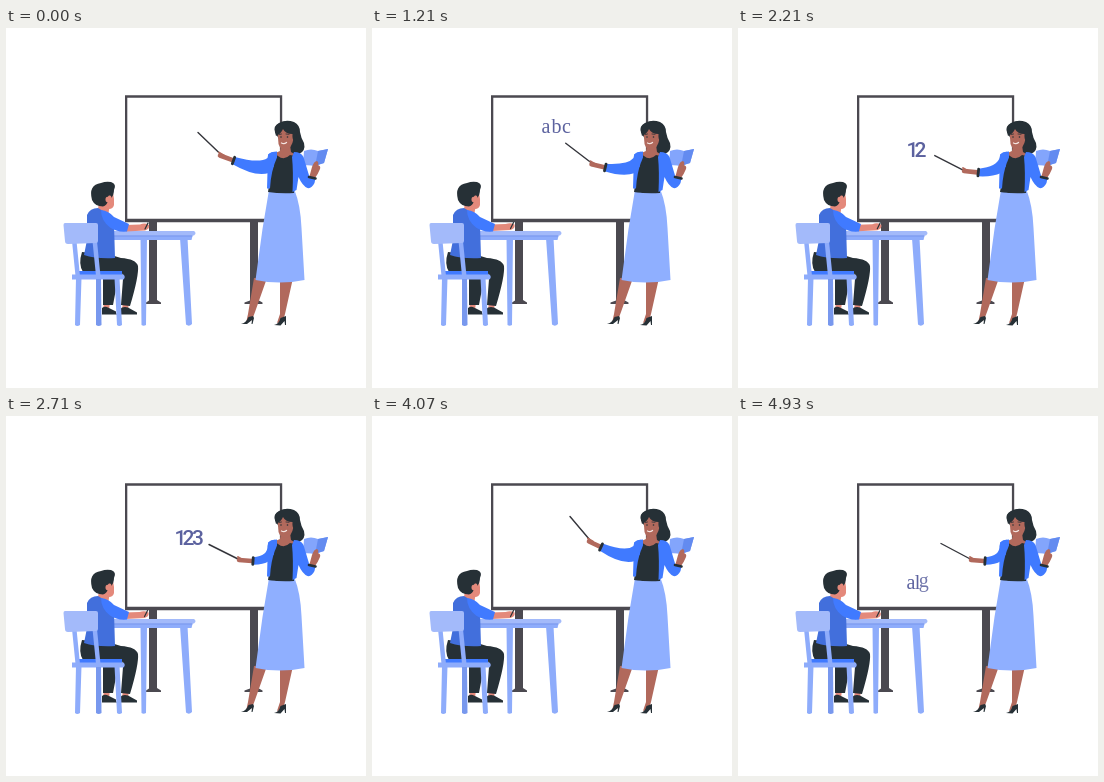
Recreate the animation shown at these times as an HTML page. Size 360x360 px, loop 5 s.

```html
<!DOCTYPE html>
<html lang="en">
<head>
<meta charset="utf-8">
<title>Lesson at the board</title>
<style>
html, body { margin: 0; width: 100%; height: 100%; overflow: hidden; background: #fff; }
svg { display: block; width: 100vw; height: 100vh; }
.serif { font: 20px "Liberation Serif", serif; }
.digit { font: 500 21px Roboto, sans-serif; font-stretch: 75%; text-anchor: middle; }
#letters { fill: #5c629f; }
.ink { fill: #263036; }
.blue { fill: #407aff; }
.shade { fill: #426fdc; }
.pale { fill: #a3bafa; }
.mid { fill: #8eacfb; }
.skin { fill: #b1695c; }
.peach { fill: #e4897b; }
.line { fill: none; stroke-linecap: round; stroke-linejoin: round; }
</style>
</head>
<body>
<svg viewBox="0 0 360 360">
  <g id="board" fill="#4b4950">
    <path d="M143 193h8v79l4 2.500v1.500h-15v-1.500l3-2zM244 193h8v79l4.500 2.500v1.500h-18v-1.500l5.500-2z"/>
    <path d="M119 67.300h157.200v127h-157.200zM121.300 69.800v121h152.600v-121z" fill-rule="evenodd"/>
  </g>
  <g id="letters"></g>

  <g id="desk">
    <path class="mid" d="M134.500 210h6.500l-1 87q-2.500 1.500-4.500 0zM174 210h7.500l4.500 86q-3 3-6 .5z"/>
    <path class="mid" d="M103 206h84l-1.500 6h-82.500z"/>
    <path class="pale" d="M103 203h85q3 2 0 4.500h-85z"/>
    <path class="line" d="M104 208h82" stroke="#6f8fe6" stroke-width=".7"/>
  </g>

  <g id="pupil">
    <path class="peach" d="M98 274h6l-1 8h-6zM117 274h6l-1 8h-6z"/>
    <path class="ink" d="M96 280q3-2 6-.5l8 4v3h-14zM116 279.500q3-1 6 0l9 5v2h-21q2-4 6-7z"/>
    <path class="ink" d="M97 240h17l-7 37h-10z"/>
    <path class="ink" d="M76 224q-4 12 1 20h37q3 0 3 7l-2 26 9 1q9-30 8-40-2-7-17-8l-10-3z"/>
    <path class="peach" d="M93 172l11 4-2 12q-8 0-10-6z"/>
    <path class="shade" d="M92 180q-8 0-11 7v25l-3 15q12 4 31 3l-1-34q-4-10-16-16z"/>
    <g id="scribe">
      <path class="peach" d="M119 197l15-.5q5-2 9 .5 1 4-4 5.500l-19 1z"/>
      <path class="line" d="M139 201l3-6" stroke="#263036" stroke-width="1.200"/>
    </g>
    <path class="blue" d="M95 182q8 1 13 7l15 7-2 7.500q-10 1-17-4-9-7-9-17.500z"/>
    <path class="peach" d="M97 165h10q1.500 6 1 12-1 4-5 4-6-1-7-8z"/>
    <path class="ink" d="M86 172q-4-15 9-17 5-2 10-1 6 2 3 8 0 5-3 8 1-3-2-2.500-2 1-1 5-1 5-5 6-8 0-11-6.500z"/>
    <ellipse class="peach" cx="101.500" cy="171.500" rx="2" ry="2.800"/>
  </g>

  <g id="chair">
    <path class="blue" d="M71 243h45v5h-45z"/>
    <path class="mid" d="M66 246.500h51.500q2.500 2.500 0 5h-51.500zM70 250h5.500l-1.500 47q-3 2-5 0zM108.500 250h5l2.500 47q-3 2-5 0z"/>
    <path d="M90 251h5l.5 46q-3 2-5.500 0z" fill="#7898ee"/>
    <path class="mid" d="M66 213h4.500l3.500 35h-4.500zM86.500 213h4.500l3.500 35h-4.500z"/>
    <path class="pale" d="M59 195h31q2 0 2 2v16q0 2-2 2l-28 1q-3 0-3-3l-1.500-16q0-2 1.500-2z"/>
  </g>

  <g id="teacher">
    <path class="skin" d="M248 250h13l-12 34-3 8-6 3 2-9zM274 250h13l-8 36-2 7-6 2 3-9z"/>
    <path class="ink" d="M235 296q5-1 7.500-7l4.500-1 1 2-1.500 6h-1l.5-4-5 4zM268 297q5-1 6.500-7l5.500-2v9h-1l-.5-4-4 4.500z"/>
    <path d="M263 162h25.500q6 15 7 38l3 52q-25 5-49 0l7-51q3-18 6.500-39z" fill="#8fafff"/>
    <path class="ink" d="M269 104q-2-6 4-9 7-4 15-1 6 3 6 10 1 6 4 11 2 8-5 11-9 2-14-4z"/>
    <path class="skin" d="M275 117h9l1 7 5 3-7 11-12-3-4-9 7-3z"/>
    <path class="ink" d="M268 126q2 0 4 2 6 5 12-1l5 1-1 37q-13 1-26-1z"/>
    <path class="skin" d="M271.500 103q5-6 15-4 2 5 1 12-2 10-8 11-5 0-7-6z"/>
    <path class="ink" d="M270 108q-3-9 2-12 8-5 16 0 5 6 2 15l-2 2q-2-2-1.500-7-7 0-9.500-5-2 5-7 7z"/>
    <path class="line" d="M273.500 106.500l2-.5M280 106l3 .3" stroke="#263036" stroke-width=".8"/>
    <g class="ink"><circle cx="275" cy="109" r=".8"/><circle cx="281.500" cy="109" r=".8"/></g>
    <path class="line" d="M275.500 115q2.500 1.500 5-.5" stroke="#f4e5e1" stroke-width="1.300"/>
    <path d="M298 123q7-3 14 0 5-1 10-2l-4 14q-5 1-9 3.500-5-2-12-1z" fill="#83a5fc"/>
    <path d="M312 123q5-1 10-2l-4 14q-5 1-9 3.500z" fill="#638bf0"/>
    <path class="skin" d="M303 150l3-11q2-6 5-6 2 1 1 4 3 1 2 4-2 5-5 9l-2 3z"/>
    <path class="blue" d="M288 124q7 0 9.500 5l6 20 6 1-1 5q-3 6-7 5-5-2-9-11l-2 13-4 2q1-20-.5-35z"/>
    <path class="line" d="M303 149l6.500 1.500" stroke="#263036" stroke-width="2.600"/>
    <path class="blue" d="M271 123.500q-6 0-9 3l-1 34h3q1-18 7-31z"/>
    <path id="sleeve" class="blue"/>
    <path id="stick" class="line" stroke="#34353b" stroke-width="1.400"/>
    <path id="hand" class="line" stroke="#b1695c" stroke-width="4.600"/>
    <path id="thumb" class="line" stroke="#b1695c" stroke-width="2"/>
    <path id="cuff" class="line" stroke="#263036" stroke-width="2.800"/>
  </g>
</svg>
<script>
const LOOP = 5000, FADE = 140;
const $ = id => document.getElementById(id);

// time, cuff x y, hand x y, stick tip x y
const poses = [
  [0, 227.5, 132.5, 214, 127.5, 192, 104.500],
  [710, 233, 135, 220, 130.5, 197, 104],
  [1710, 233.5, 144, 219, 142, 190.5, 126.500],
  [2710, 247, 145, 233, 144, 203, 128.500],
  [3500, 236, 138.5, 223, 134, 198, 111],
  [4070, 229, 131, 217, 125.5, 198, 100.500],
  [4930, 247, 145, 233, 144, 203, 127.500]
];

// glyph, class, x, baseline, start, end
const glyphs = [
  ["a", "serif", 169.5, 105, 130, 2150],
  ["b", "serif", 179.5, 105, 380, 1900],
  ["c", "serif", 190, 105, 630, 1500],
  ["1", "digit", 174.5, 129, 1570, 3820],
  ["2", "digit", 182.5, 129, 1950, 3620],
  ["3", "digit", 192, 129, 2300, 3340],
  ["a", "serif", 168.5, 172.5, 4350, 5200],
  ["l", "serif", 176.7, 172.5, 4590, 5200],
  ["g", "serif", 180.7, 171, 4810, 5200]
].map(([text, cls, x, y, start, end]) => {
  const el = document.createElementNS("http://www.w3.org/2000/svg", "text");
  el.textContent = text;
  el.setAttribute("class", cls);
  el.setAttribute("x", x);
  el.setAttribute("y", y);
  $("letters").append(el);
  return { el, start, end };
});

const clamp = v => Math.max(0, Math.min(1, v));
const mix = (a, b, k) => a + (b - a) * k;

function poseAt(t) {
  let i = 0;
  while (i < poses.length - 2 && t > poses[i + 1][0]) i++;
  const a = poses[i], b = poses[i + 1];
  const k = clamp((t - a[0]) / (b[0] - a[0]));
  const ease = k * k * (3 - 2 * k);
  return a.slice(1).map((v, j) => mix(v, b[j + 1], ease));
}

function draw(t) {
  const [cx, cy, hx, hy, tx, ty] = poseAt(t);
  const reach = 247 - cx;
  const len = Math.hypot(cx - hx, cy - hy);
  const ux = (cx - hx) / len, uy = (cy - hy) / len;
  const nx = -uy * 3.8, ny = ux * 3.8;
  const top = `${262 - reach * .45} ${140 - reach * .22}`;
  const low = `${257 - reach * .4} ${149 + reach * .02}`;

  $("sleeve").setAttribute("d",
    `M267 124Q262 125 261.500 130Q${top} ${cx - nx} ${cy - ny}L${cx + nx} ${cy + ny}Q${low} 263 145L268 138Z`);
  $("cuff").setAttribute("d",
    `M${cx - nx * .9} ${cy - ny * .9}L${cx + nx * .9} ${cy + ny * .9}`);
  $("hand").setAttribute("d", `M${cx - ux} ${cy - uy}L${hx} ${hy}`);
  $("thumb").setAttribute("d", `M${hx + 4} ${hy}L${hx - 1} ${hy - 3}`);
  $("stick").setAttribute("d", `M${tx} ${ty}L${hx + 3} ${hy + 1}`);

  for (const { el, start, end } of glyphs)
    el.setAttribute("opacity", Math.min(clamp((t - start) / FADE), clamp((end - t) / FADE)));

  const wag = Math.sin(t / LOOP * Math.PI * 14) * .5;
  $("scribe").setAttribute("transform", `translate(${wag} ${-Math.abs(wag)})`);
}

const begin = performance.now();
function tick() {
  draw((performance.now() - begin) % LOOP);
  requestAnimationFrame(tick);
}
tick();
</script>
</body>
</html>
```
